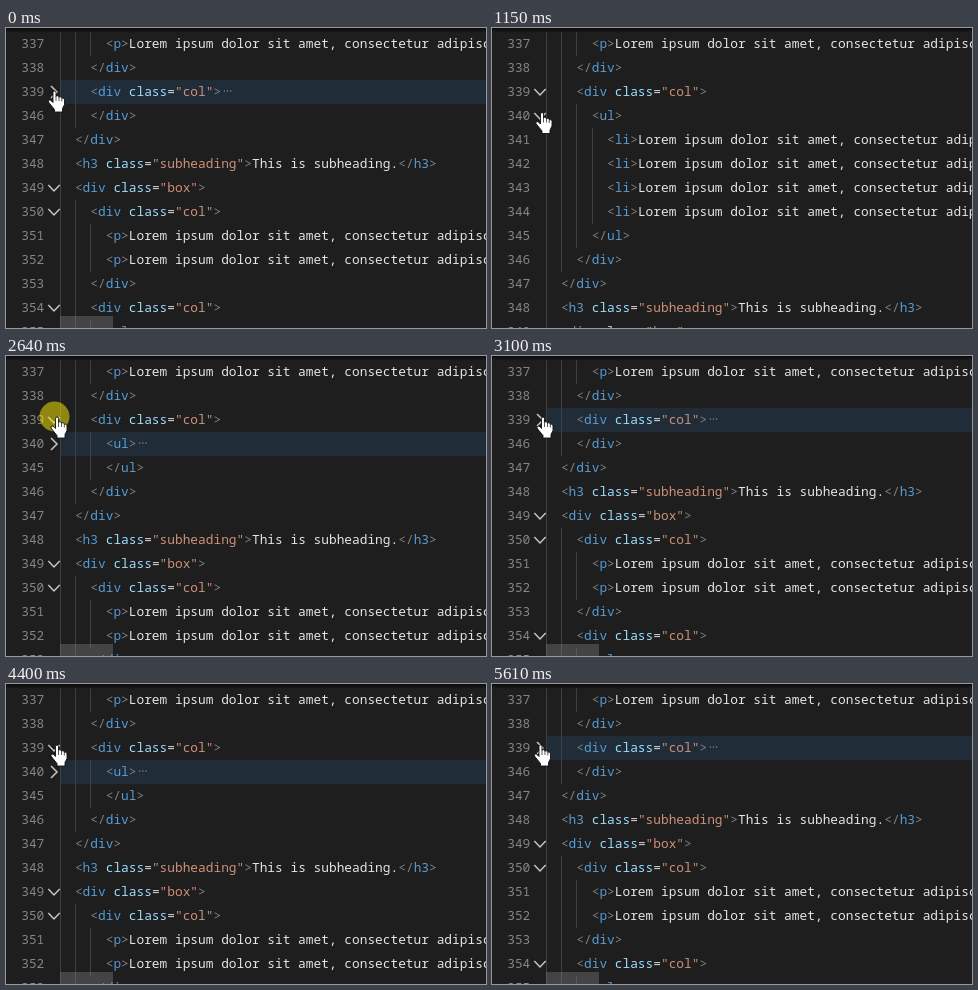
An HTML page that plays this animation: 480 px wide and 300 px high, repeating every 5.66 s.

```html
<!DOCTYPE html>
<html lang="en">
<head>
<meta charset="utf-8">
<title>Code folding</title>
<style>
  html, body { margin: 0; width: 480px; height: 300px; overflow: hidden; background: #1e1e1e; }
  svg { display: block; }
  text { font: 12.83px "Noto Sans Mono", "DejaVu Sans Mono", monospace; white-space: pre; fill: #e4e4e4; }
  .num { fill: #858585; text-anchor: end; }
  .punct { fill: #808080; }
  .tag { fill: #569cd6; }
  .attr { fill: #9cdcfe; }
  .eq { fill: #d4d4d4; }
  .str { fill: #ce9178; }
  .guide { fill: #404040; }
  .fold { fill: #202d39; }
  .dots { fill: #8a8a8a; }
  .chevron { fill: none; stroke: #c5c5c5; stroke-width: 1.5; }
</style>
</head>
<body>
<svg width="480" height="300" viewBox="0 0 480 300">
  <defs>
    <linearGradient id="shade" x2="0" y2="1">
      <stop stop-color="#000" stop-opacity=".7"/>
      <stop offset="1" stop-color="#000" stop-opacity="0"/>
    </linearGradient>
  </defs>
  <g id="code"></g>
  <rect width="480" height="5" fill="url(#shade)"/>
  <rect id="bar" x="54" y="288" width="53" height="12" fill="#797979" fill-opacity=".42"/>
  <circle id="press" r="15" fill="#fff000" fill-opacity=".5"/>
  <g id="hand" stroke="#111" stroke-width=".9">
    <path fill="#fff" d="M5 2Q5 .5 6.5 .5Q8 .5 8 2V6Q8.5 5 9.7 5.2Q11 5.4 11 7Q11.5 6 12.7 6.3Q13.8 6.6 13.8 8Q14.5 7.3 15.5 7.8Q16.5 8.3 16.5 9.5V14L14.5 18V21.5H6.5V19L2 13.5L.5 11.5Q0 10 1.5 9.5Q2.5 9.3 4 11L5 12Z"/>
    <path d="M8 6V10.5M11 7V10.5M13.8 8V11" stroke-width=".7"/>
  </g>
</svg>
<script>
const LOOP = 5660, CHAR = 7.697, LEFT = 53.5, ROW = 24, TOP = 4;
const $ = id => document.getElementById(id);

const lorem = 'Lorem ipsum dolor sit amet, consectetur adipiscing elit.';
const para = `<p>${lorem}</p>`, item = `<li>${lorem}</li>`;
const col = '<div class="col">', end = '</div>';

// Lines from 337 on: [indent, source, foldable]
const lines = [
  [6, para], [4, end], [4, col, 1], [6, '<ul>', 1],
  [8, item], [8, item], [8, item], [8, item],
  [6, '</ul>'], [4, end], [2, end],
  [2, '<h3 class="subheading">This is subheading.</h3>'],
  [2, '<div class="box">', 1], [4, col, 1], [6, para], [6, para],
  [4, end], [4, col, 1], [6, '<ul>', 1]
].map(([indent, src, foldable], i) => ({ n: 337 + i, indent, src, foldable }));

const span = (cls, s) =>
  `<tspan class="${cls}">${s.replace(/</g, '&lt;').replace(/>/g, '&gt;')}</tspan>`;

function highlight(src) {
  return src.replace(/(<\/?)(\w+)(?:( class)(=)("[^"]*"))?(>)/g,
    (_, open, tag, attr, eq, str, close) =>
      span('punct', open) + span('tag', tag) +
      (attr ? span('attr', attr) + span('eq', eq) + span('str', str) : '') +
      span('punct', close));
}

function drawRow({ n, indent, src, foldable }, row, folded) {
  const y = TOP + row * ROW, mid = y + 12, x = LEFT + indent * CHAR;
  let out = folded ? `<rect class="fold" x="54" y="${y}" width="426" height="${ROW}"/>` : '';
  for (let c = 0; c < indent; c += 2)
    out += `<rect class="guide" x="${Math.round(LEFT + c * CHAR)}" y="${y}" width="1" height="${ROW}"/>`;
  out += `<text class="num" x="38.3" y="${y + 16}">${n}</text>`;
  out += `<text x="${x}" y="${y + 16}">${highlight(src)}</text>`;
  if (foldable)
    out += `<path class="chevron" d="${folded ? `M45 ${mid - 6}l6 6l-6 6` : `M42.3 ${mid - 3}l5.7 6l5.7 -6`}"/>`;
  if (folded)
    for (let i = 0; i < 3; i++)
      out += `<circle class="dots" cx="${x + src.length * CHAR + 3.3 + i * 3.1}" cy="${mid - 1}" r=".7"/>`;
  return out;
}

// Hides the lines strictly between a folded header and its closing tag.
function drawView(id, header, close) {
  const rows = lines.filter(l => !(l.n > header && l.n < close)).slice(0, 13);
  return `<g id="${id}">${rows.map((l, i) => drawRow(l, i, l.n === header)).join('')}</g>`;
}

$('code').innerHTML =
  drawView('closed', 339, 346) + drawView('open', 0, 0) + drawView('inner', 340, 345);

const views = [
  [0, 'closed'], [360, 'open'], [2000, 'inner'], [2770, 'closed'],
  [3480, 'open'], [4070, 'inner'], [4710, 'closed']
];
const presses = [[280, 590], [1900, 2170], [2640, 2970], [3330, 3660], [3940, 4250], [4580, 4910]];
const handPath = [
  [0, 42, 62.5], [620, 42, 62.5], [770, 43.5, 84], [1380, 43.5, 84], [1520, 43, 83.5],
  [2170, 43, 83.5], [2310, 44.5, 60.5], [5610, 44.5, 60.5], [5610, 42, 60.5], [LOOP, 42, 60.5]
];

const clamp = v => Math.max(0, Math.min(1, v));

function handAt(t) {
  const i = handPath.findIndex(k => k[0] > t);
  const [t0, x0, y0] = handPath[i - 1], [t1, x1, y1] = handPath[i];
  const p = (t - t0) / (t1 - t0), e = p * p * (3 - 2 * p);
  return [x0 + (x1 - x0) * e, y0 + (y1 - y0) * e];
}

function frame() {
  const t = performance.now() % LOOP;
  const view = views.filter(v => v[0] <= t).pop()[1];
  for (const [, id] of views) $(id).style.display = id === view ? '' : 'none';

  const [x, y] = handAt(t);
  $('hand').setAttribute('transform', `translate(${x} ${y})`);
  $('press').setAttribute('transform', `translate(${x + 4} ${y})`);
  const press = presses.find(([on, off]) => t >= on && t < off + 80);
  $('press').style.opacity = press ? clamp((press[1] + 80 - t) / 80) : 0;

  $('bar').style.opacity = t < 1380 ? clamp((1150 - t) / 130) : clamp((t - 1380) / 140);
  requestAnimationFrame(frame);
}
frame();
</script>
</body>
</html>
```
